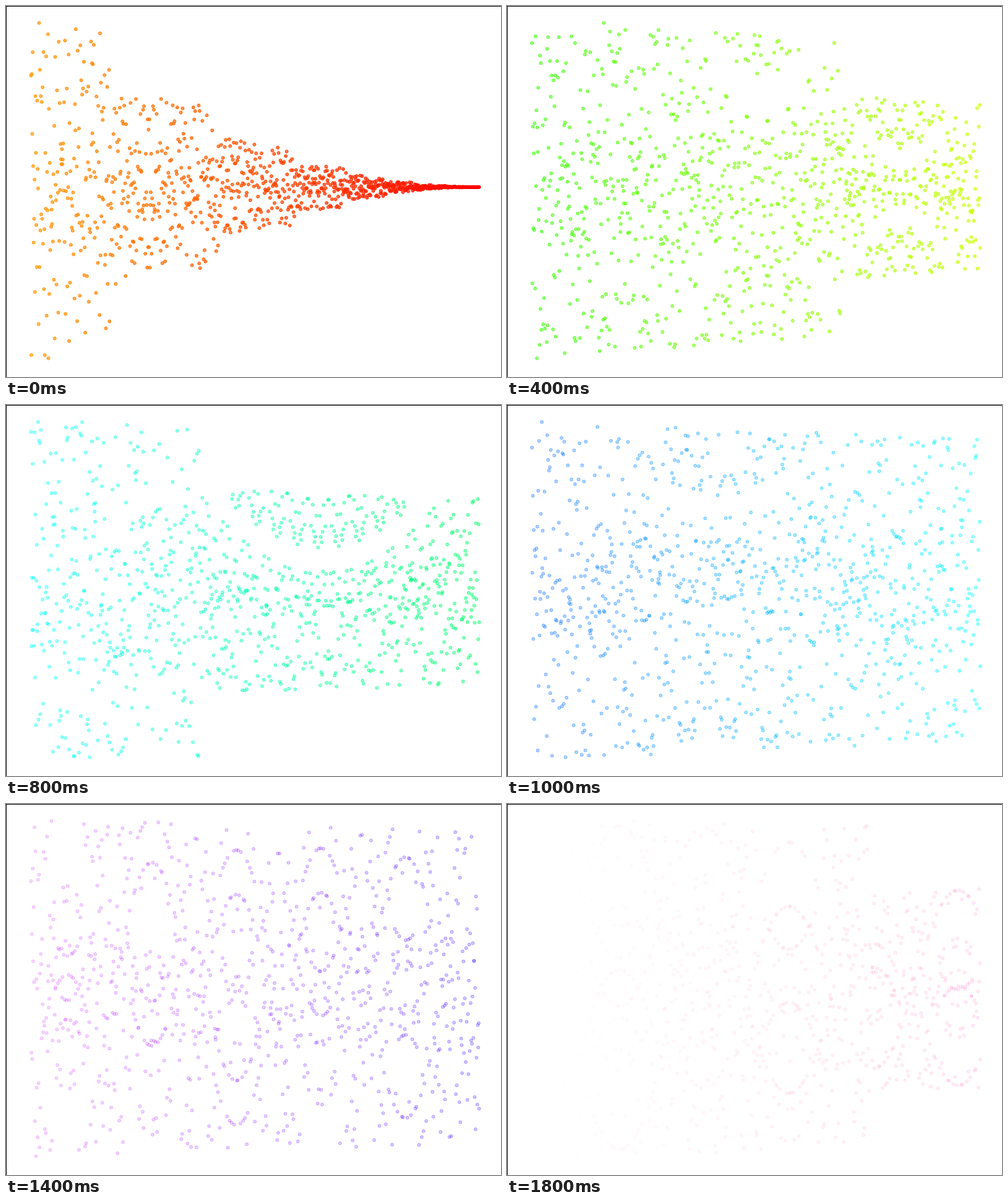
Recreate the animation shown at these times as an HTML page with a canvas. Size 800 by 600 pixels, loop 2000 ms.

```html
<!DOCTYPE html>
<html>
<head>
<meta charset="utf-8">
<style>
  html, body { margin: 0; width: 100%; height: 100%; overflow: hidden; background: #fff; }
  canvas { display: block; }
</style>
</head>
<body>
<canvas id="stage" width="800" height="600"></canvas>
<script>
const ctx = document.getElementById('stage').getContext('2d');
const PAGES = 10, PER_PAGE = 1000, PAGE_MS = 200;
const LEFT = 40.3, RIGHT = 764.7, TOP = 27.4, BOTTOM = 569.7;

// sin(pi n^2) should be zero; what is plotted is its floating point error.
const errorAt = n => Math.sin(n * n * Math.PI);

function drawPage(page) {
  const first = page * PER_PAGE + 1;
  const values = Array.from({ length: PER_PAGE }, (_, i) => errorAt(first + i));
  const low = Math.min(...values), high = Math.max(...values);

  ctx.globalAlpha = 1;
  ctx.fillStyle = '#fff';
  ctx.fillRect(0, 0, 800, 600);
  ctx.fillStyle = '#000';
  ctx.fillRect(0, 0, 800, 1);
  ctx.fillRect(0, 0, 1, 600);

  ctx.lineWidth = 1;
  values.forEach((value, i) => {
    const progress = (first + i) / (PAGES * PER_PAGE);
    const x = RIGHT - (RIGHT - LEFT) * i / (PER_PAGE - 1);
    const y = TOP + (BOTTOM - TOP) * (value - low) / (high - low);
    ctx.fillStyle = ctx.strokeStyle = `hsl(${360 * progress}, 100%, 50%)`;
    ctx.beginPath();
    ctx.arc(x, y, 2.5, 0, 2 * Math.PI);
    ctx.globalAlpha = 0.75 * (1 - progress);
    ctx.fill();
    ctx.globalAlpha = 1 - progress;
    ctx.stroke();
  });
}

let shown = -1;
function tick() {
  const page = Math.floor(performance.now() / PAGE_MS) % PAGES;
  if (page !== shown) drawPage(shown = page);
  requestAnimationFrame(tick);
}
tick();
</script>
</body>
</html>
```
